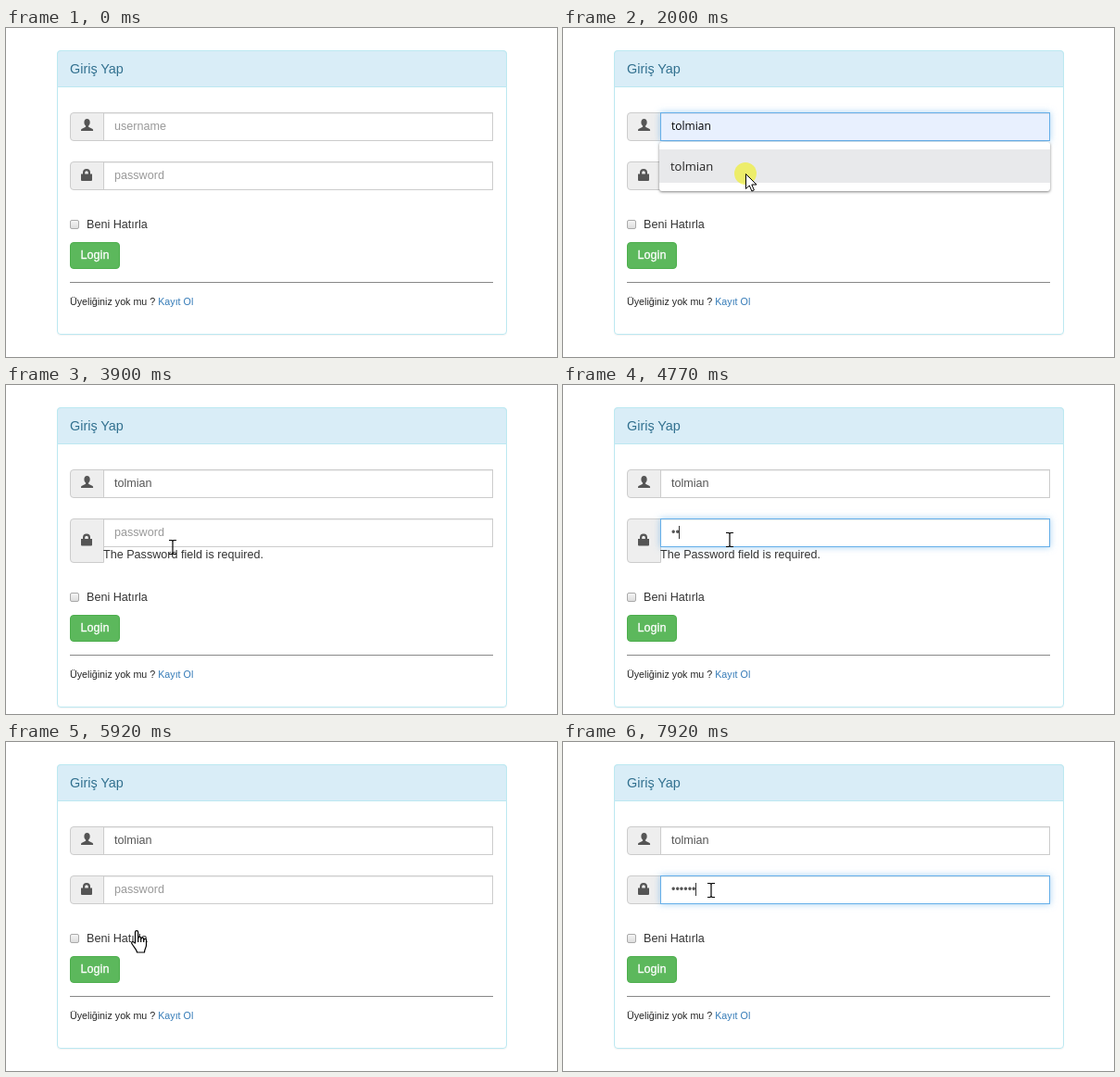
Recreate the animation shown at these times as an HTML page. Size 595 by 355 pixels, loop 8000 ms.

```html
<!DOCTYPE html>
<html lang="tr">
<head>
<meta charset="utf-8">
<style>
html, body { margin: 0; width: 100%; height: 100%; overflow: hidden; background: #fff; }
body { position: relative; font: 12.6px "Liberation Sans", Arial, sans-serif; color: #333; }
div { position: absolute; box-sizing: border-box; white-space: pre; }
#panel { left: 55px; top: 24px; width: 486px; height: 307px; border: 1px solid #bce8f1; border-radius: 4px; box-shadow: 0 1px 1px rgba(0,0,0,.05); }
#head { left: 55px; top: 24px; width: 486px; height: 40px; padding-left: 13px; border: 1px solid #bce8f1; border-radius: 4px 4px 0 0; background: #d9edf7; color: #31708f; font-size: 14.4px; line-height: 38px; }
.addon { left: 69px; width: 37px; height: 31px; background: #eee; border: 1px solid #ccc; border-radius: 4px 0 0 4px; }
.field { left: 105px; width: 421px; height: 31px; border: 1px solid #ccc; padding-left: 11px; line-height: 28px; background: #fff; }
svg { position: absolute; left: 0; top: 0; width: 595px; height: 355px; overflow: visible; }
#menu { left: 104px; top: 123px; width: 422px; height: 53px; background: #fff; border-radius: 3px; box-shadow: 0 1px 3px rgba(0,0,0,.5); }
#row { left: 0; top: 8px; width: 422px; height: 36px; padding-left: 12px; font: 13px/36px "Open Sans", sans-serif; color: #222; }
#low { left: 0; top: 0; width: 595px; height: 355px; }
#check { left: 69px; top: 207px; width: 10px; height: 10px; border: 1px solid #aaa; border-radius: 2px; background: linear-gradient(#f4f4f4, #ddd); }
#login { left: 69px; top: 231px; width: 54px; height: 29px; border: 1px solid; border-radius: 4px; color: #fff; line-height: 27px; text-align: center; -webkit-text-stroke: .3px #fff; }
#rule { left: 69px; top: 274px; width: 457px; height: 1px; background: #888; }
#caret { top: 152px; width: 1px; height: 14px; background: #333; }
</style>
</head>
<body>
<div id="panel"></div>
<div id="head">Giriş Yap</div>
<div class="addon" style="top:91px"></div>
<div class="addon" id="lockBox" style="top:144px"></div>
<div class="field" id="user" style="top:91px"></div>
<div class="field" id="pass" style="top:144px"></div>
<svg fill="#555">
  <path d="M87.5 98c2 0 3.2 1.5 3.2 3.7 0 1.8-.7 3-1.6 3.8v1.2l4 2c.8.4 1 1 1 2.3H81c0-1.300.2-1.900 1-2.300l4-2v-1.200c-.9-.800-1.600-2-1.600-3.800 0-2.200 1.200-3.700 3.100-3.700z"/>
  <path id="lock" fill-rule="evenodd" d="M81 157.500h2v-1.500a4 4 0 0 1 8 0v1.500h2v6.500q0 1-1 1h-10q-1 0-1-1zM85.200 157.500h3.600v-1.500a1.800 1.800 0 0 0-3.600 0z"/>
</svg>
<div id="caret"></div>
<div id="error" style="left:105px;top:175px;line-height:16px">The Password field is required.</div>
<div id="low">
  <div id="check"></div>
  <div style="left:87px;top:203px;line-height:18px">Beni Hatırla</div>
  <div id="login">Login</div>
  <div id="rule"></div>
  <div style="left:69px;top:287px;font-size:10.71px;line-height:16px;color:#222">Üyeliğiniz yok mu ? <span style="color:#337ab7">Kayıt Ol</span></div>
</div>
<div id="menu"><div id="row"></div></div>
<svg><g id="mouse">
  <circle id="halo" r="12" fill="#f0f000" opacity=".55"/>
  <path id="arrow" d="M.5.500V16.500l3.800-3.500 2.600 6 2.500-1.100-2.600-5.900H12z" fill="#fff" stroke="#000"/>
  <path id="beam" d="M-4-7.500h3l1 1 1-1h3M0-7V7M-4 7.500h3l1-1 1 1h3" fill="none" stroke="#000" stroke-width="1.200"/>
  <g id="hand" transform="translate(-6)" fill="#fff" stroke="#000" stroke-width="1.200" stroke-linejoin="round">
    <path d="M5.500 14V2.200a1.600 1.600 0 0 1 3.200 0V8.500a1.500 1.500 0 0 1 3 .2v.8a1.500 1.500 0 0 1 3 .3v.8a1.400 1.400 0 0 1 2.800.3V16c0 3-2 4-2 8H7.500c0-2.500-3-5-5.500-9.200-1.200-2 1-3 2.200-1.600z"/>
    <path d="M8.700 8v5M11.700 9v4M14.700 10v3" fill="none"/>
  </g>
</g></svg>
<script>
const $ = id => document.getElementById(id);
const NAME = 'tolmian';
const LOOP = 8000;

// Pointer stops: time, x, y
const path = [
  [20, 475, 327], [630, 117, 99], [1180, 117, 99], [1740, 197, 157],
  [2390, 197, 157], [2960, 108, 249], [3700, 108, 249], [3900, 180, 174.5],
  [4030, 180, 174.5], [4150, 180, 167], [4990, 180, 167], [5300, 114, 253],
  [5720, 114, 253], [5920, 140, 203], [6250, 160, 160], [LOOP, 160, 160]
];
const clicks = [[1100, 1250], [2000, 2200], [3040, 3190], [4510, 4640], [5420, 5560], [6300, 6440]];
const keys = [
  [4640, 4710, 4780, 4850, 4920, 4990],
  [6870, 7300, 7410, 7640, 7840, 7920]
];

const within = (t, a, b) => t >= a && t < b;
const ramp = (t, a, d = 150) => Math.max(0, Math.min(1, (t - a) / d));
const show = (id, on) => $(id).style.display = on ? '' : 'none';
const mix = (a, b, k) => `rgb(${a.map((v, i) => Math.round(v + (b[i] - v) * k))})`;

function pointer(t) {
  const i = Math.max(1, path.findIndex(p => p[0] > t));
  const [t0, x0, y0] = path[i - 1], [t1, x1, y1] = path[i];
  const u = ramp(t, t0, t1 - t0), k = u * u * (3 - 2 * u);
  return [x0 + (x1 - x0) * k, y0 + (y1 - y0) * k];
}

function glow(el, k) {
  el.style.borderColor = mix([204, 204, 204], [102, 175, 233], k);
  el.style.boxShadow = `inset 0 1px 1px rgba(0,0,0,.075), 0 0 7px rgba(102,175,233,${.6 * k})`;
}

function draw(t) {
  const failed = within(t, 3320, 5720), shift = failed ? 17 : 0;
  const menu = within(t, 1220, 2080), filled = t >= 1500;
  const [x, y] = pointer(t);
  const hit = (l, top, r, b) => x >= l && x <= r && y >= top && y <= b;

  // Page layout
  $('panel').style.height = 307 + shift + 'px';
  $('low').style.top = shift + 'px';
  $('lockBox').style.height = 31 + shift + 'px';
  $('lock').setAttribute('transform', `translate(0 ${shift / 2})`);
  show('error', failed);

  // User name
  const user = $('user'), preview = within(t, 1500, 2080), auto = within(t, 1500, 3320);
  user.textContent = filled ? NAME : 'username';
  user.style.color = auto ? '#000' : filled ? '#555' : '#999';
  user.style.background = auto ? '#e8f0fe' : '#fff';
  user.style.fontFamily = preview ? '"Open Sans", sans-serif' : '';
  user.style.fontSize = preview ? '12px' : '';
  glow(user, t < 3320 ? ramp(t, 1100) - ramp(t, 3040) : 0);
  user.style.zIndex = '';
  show('menu', menu);
  $('row').textContent = NAME;
  $('row').style.background = preview ? '#e8e9eb' : '#fff';

  // Password
  const typed = t < 5720 ? keys[0] : keys[1];
  const dots = typed.filter(k => t >= k).length;
  const pass = $('pass');
  pass.textContent = dots ? '•'.repeat(dots) : 'password';
  pass.style.color = dots ? '#555' : '#999';
  glow(pass, t < 5720 ? ramp(t, 4510) - ramp(t, 5420) : ramp(t, 6300));
  show('caret', within(t, 4510, 5420) || t >= 6300);
  $('caret').style.left = Math.round(116.500 + dots * 4.410) + 'px';

  // Button
  const overButton = t >= 20 && hit(69, 231 + shift, 123, 260 + shift);
  const pressed = within(t, 3040, 3190) || within(t, 5420, 5560);
  const focused = within(t, 3040, 3320) || within(t, 5420, 5720);
  const login = $('login').style;
  login.background = pressed ? '#398439' : overButton ? '#449d44' : '#5cb85c';
  login.borderColor = pressed ? '#2d6a2d' : overButton ? '#398439' : '#4cae4c';
  login.boxShadow = focused ? '0 0 0 1px #7ba7e8, 0 0 3px #5b95e5' : 'none';

  // Pointer
  const overField = !(menu && y > 123) && (hit(105, 91, 526, 122) || hit(105, 144, 526, 175));
  const overLabel = hit(69, 200 + shift, 153, 221 + shift);
  const kind = overField ? 'beam' : overButton || overLabel ? 'hand' : 'arrow';
  for (const id of ['arrow', 'beam', 'hand']) show(id, id === kind);
  show('mouse', t >= 20);
  show('halo', clicks.some(([a, b]) => within(t, a, b)));
  $('mouse').setAttribute('transform', `translate(${Math.round(x)} ${Math.round(y)})`);
}

const start = performance.now();
function tick() {
  draw((performance.now() - start) % LOOP);
  requestAnimationFrame(tick);
}
tick();
</script>
</body>
</html>
```
